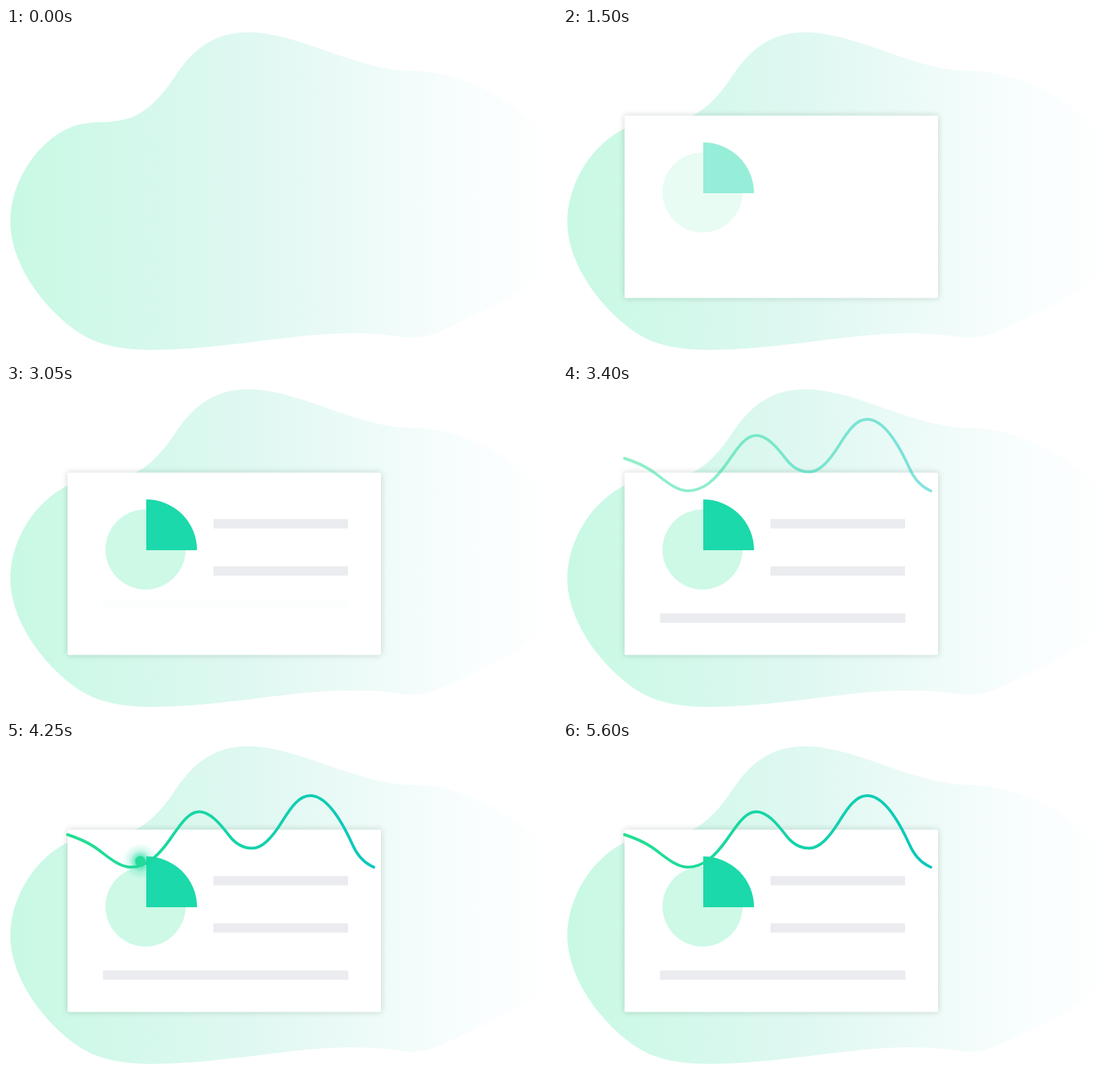
Write an HTML page that moves like this. It is 770x460 px and loops after 6000 ms.

```html
<!DOCTYPE html>
<html lang="en">
<head>
<meta charset="utf-8">
<title>Report card</title>
<style>
  html, body { margin: 0; width: 100%; height: 100%; overflow: hidden; background: #fff; }
  svg { display: block; width: 770px; height: 460px; }
</style>
</head>
<body>
<svg viewBox="0 0 770 460">
  <defs>
    <linearGradient id="mint" gradientUnits="userSpaceOnUse" x1="6" y1="0" x2="770" y2="0">
      <stop offset="0" stop-color="#c8f9e4"/>
      <stop offset=".45" stop-color="#e0f8f2"/>
      <stop offset=".8" stop-color="#f7fdfd"/>
      <stop offset="1" stop-color="#fff"/>
    </linearGradient>
    <linearGradient id="stroke" gradientUnits="userSpaceOnUse" x1="86" y1="0" x2="514" y2="0">
      <stop offset="0" stop-color="#22e091"/>
      <stop offset="1" stop-color="#0bc8bd"/>
    </linearGradient>
    <radialGradient id="halo">
      <stop offset="0" stop-color="#14d6a0" stop-opacity=".8"/>
      <stop offset=".3" stop-color="#14d6a0" stop-opacity=".6"/>
      <stop offset=".6" stop-color="#14d6a0" stop-opacity=".2"/>
      <stop offset="1" stop-color="#14d6a0" stop-opacity="0"/>
    </radialGradient>
    <filter id="soft" filterUnits="userSpaceOnUse" x="60" y="95" width="490" height="310">
      <feGaussianBlur stdDeviation="4.5"/>
    </filter>
  </defs>

  <path fill="url(#mint)" d="M6 270C6 215 45 155 95 137C122 129 140 134 165 128C197 121 220 92 238 65
    C262 29 292 6 338 6C410 6 490 60 568 60C640 60 720 105 770 165C790 210 775 320 735 357
    C718 372 640 410 605 425C590 431 578 433 565 433C550 433 540 427 480 427C400 427 300 450 205 450
    C160 450 130 443 107 429C60 400 6 335 6 270Z"/>

  <g id="card">
    <rect x="86" y="122.5" width="438" height="255" rx="2" fill="#0c3a2c" fill-opacity=".2" filter="url(#soft)"/>
    <rect x="86" y="122.5" width="438" height="255" rx="2" fill="#fff"/>
  </g>

  <g id="pie">
    <circle cx="195" cy="230" r="56" fill="#cdf9e6"/>
    <path d="M196 231V160A71 71 0 0 1 267 231Z" fill="#1bd9aa"/>
  </g>

  <g fill="#ebecf0">
    <rect id="bar1" x="290" y="187.5" width="188" height="13"/>
    <rect id="bar2" x="290" y="253.5" width="188" height="13"/>
    <rect id="bar3" x="135.5" y="319.5" width="343" height="13"/>
  </g>

  <path id="line" fill="none" stroke="url(#stroke)" stroke-width="4" stroke-linecap="round"
    d="M86 129.5C100 134 112 139 124 147C140 158 157 175 174 175C197 175 213 159 230 135
    C243 116 255 97.5 270 97.5C285 97.5 299 114 312 131C322 144 332 148.5 344 148.5
    C358 148.5 371 135 386 111C399 90 410 75 425 75C444 75 464 99 484 143C490 157 500 169 514 175"/>

  <path id="track" fill="none" d="M84 129C118 138 147 170 174 170C210 170 236 99 269 99
    C300 99 315 147 343 147C375 147 395 80 425 80C445 80 458 102 469 125"/>

  <g id="dot">
    <circle r="25" fill="url(#halo)"/>
    <circle r="7.2" fill="#21dc98"/>
  </g>
</svg>
<script>
  const LOOP = 6000, STEP = 50;
  const el = id => document.getElementById(id);
  const track = el('track'), trackLength = track.getTotalLength();

  // 0 before start, 1 after end, linear between
  const ramp = (t, start, end) => Math.min(1, Math.max(0, (t - start) / (end - start)));

  // Parts drop in from above: time span, distance, and when the fade is done
  const parts = [
    { id: 'card', start: 0, end: 1300, drop: 89.5, opaque: 1100 },
    { id: 'pie', start: 1250, end: 1800, drop: 0 },
    { id: 'bar1', start: 2100, end: 2400, drop: 21 },
    { id: 'bar2', start: 2100, end: 2700, drop: 40 },
    { id: 'bar3', start: 3000, end: 3350, drop: 23 },
    { id: 'line', start: 3100, end: 3700, drop: 54 }
  ].map(part => ({ ...part, node: el(part.id) }));
  const dot = el('dot');

  function draw(t) {
    for (const { node, start, end, drop, opaque = end } of parts) {
      node.setAttribute('opacity', ramp(t, start, opaque));
      node.setAttribute('transform', `translate(0 ${drop * (ramp(t, start, end) - 1)})`);
    }
    const p = track.getPointAtLength(trackLength * ramp(t, 3900, 5400));
    dot.setAttribute('transform', `translate(${p.x} ${p.y})`);
    dot.setAttribute('opacity', ramp(t, 3680, 3900) * (1 - ramp(t, 5400, 5600)));
  }

  const origin = performance.now();
  function tick() {
    const t = (performance.now() - origin) % LOOP;
    draw(Math.floor(t / STEP) * STEP);
    requestAnimationFrame(tick);
  }
  draw(0);
  requestAnimationFrame(tick);
</script>
</body>
</html>
```
